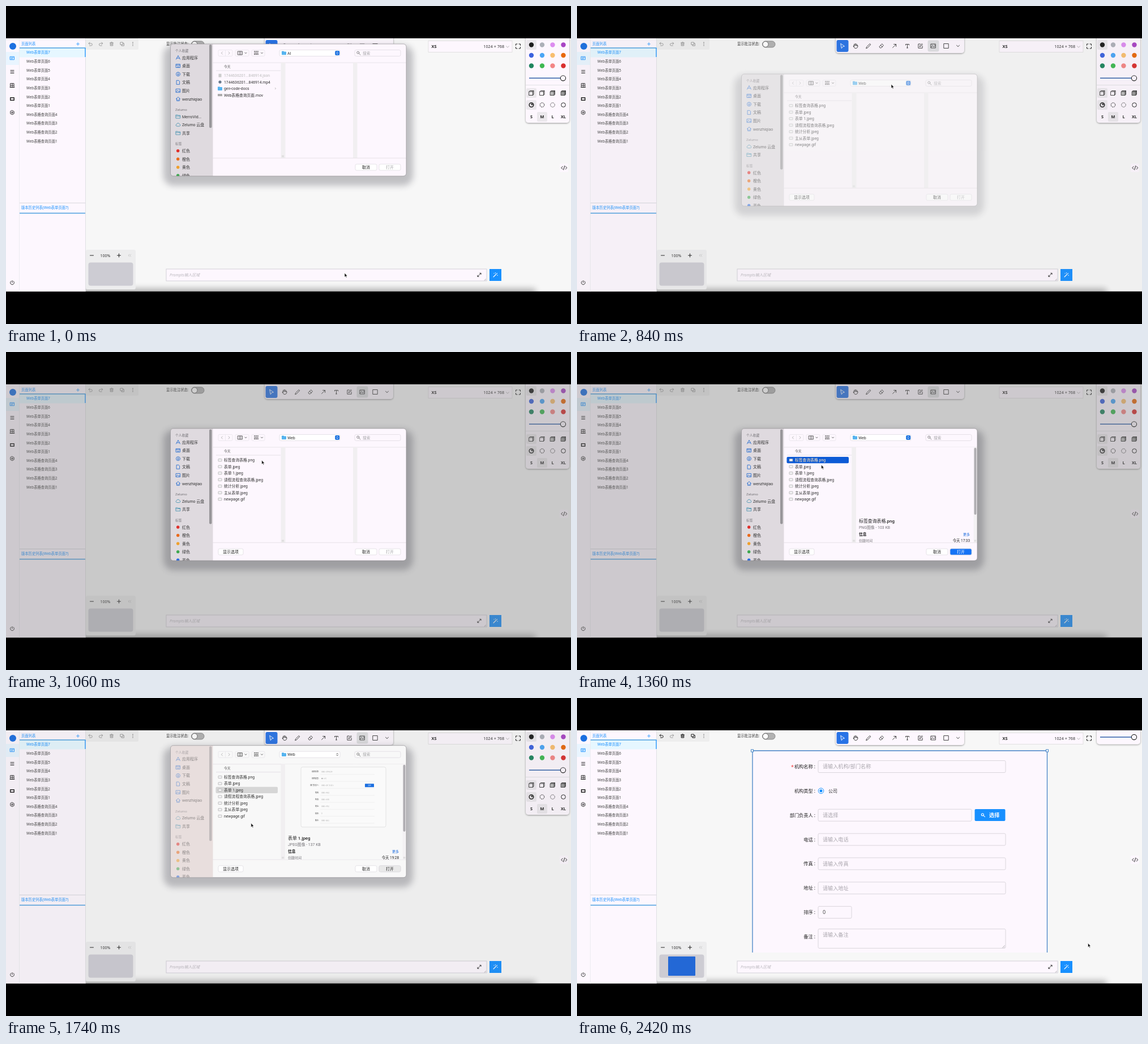
Animation of 998 by 561 pixels, one loop 2.44 s. Source, as an HTML page:

```html
<!DOCTYPE html>
<html>
<head>
<meta charset="utf-8">
<title>Page designer</title>
<style>
html, body { margin: 0; width: 100%; height: 100%; overflow: hidden; background: #000; }
svg { display: block; width: 100vw; height: 100vh; }
text { font-family: "Noto Sans", "Noto Sans CJK SC", "Noto Sans CJK", sans-serif; white-space: pre; }
#dialog text { font-family: Roboto, "Noto Sans CJK SC", "Noto Sans CJK", sans-serif; }
</style>
</head>
<body>
<svg id="stage" viewBox="0 0 998 561"></svg>
<script>
const LOOP = 2440, STEP = 20;
const PANEL = '#fdf7fe', BLUE = '#1890ff', INK = '#222', SOFT = '#a5a5a8';

// markup helpers
const rect = (x, y, w, h, fill, extra = '') =>
  `<rect x="${x}" y="${y}" width="${w}" height="${h}" fill="${fill}" ${extra}/>`;
const line = (x1, y1, x2, y2, color, w = 1) =>
  `<path d="M${x1} ${y1}L${x2} ${y2}" stroke="${color}" stroke-width="${w}"/>`;
const dot = (x, y, r, fill, extra = '') => `<circle cx="${x}" cy="${y}" r="${r}" fill="${fill}" ${extra}/>`;
const text = (x, y, s, size = 6.3, fill = '#333', extra = '') =>
  `<text x="${x}" y="${y + size * .36}" font-size="${size}" fill="${fill}" ${extra}>${s}</text>`;
const icon = (x, y, d, color = INK, w = .8, fill = 'none') =>
  `<path transform="translate(${x} ${y})" d="${d}" fill="${fill}" stroke="${color}" stroke-width="${w}" stroke-linecap="round" stroke-linejoin="round"/>`;
const group = (id, body, extra = '') => `<g id="${id}" ${extra}>${body}</g>`;
const END = 'text-anchor="end"', MID = 'text-anchor="middle"', BOLD = 'font-weight="600"';

const I = {
  undo: 'M-3 -1H1.3a2 2 0 0 1 0 4H-1.5M-1 -3L-3 -1L-1 1',
  redo: 'M3 -1H-1.3a2 2 0 0 0 0 4H1.5M1 -3L3 -1L1 1',
  trash: 'M-3 -2H3M-1 -2V-3.2H1V-2M-2.3 -2V3H2.3V-2M-.8 -.5V1.8M.8 -.5V1.8',
  copy: 'M-3 -3H1.2V1.2H-3ZM-1.2 1.2V3.2H3.2V-1.2H1.2',
  more: 'M0 -2.7v.1M0 0v.1M0 2.7v.1',
  pick: 'M-3 -4L3.5 .5L.4 1.2L-1.5 4Z',
  hand: 'M-2.4 .5V-3M-.8 -.5V-4M.8 -.5V-4M2.4 0V-3M2.4 -1L4 -1V1.5Q3 4.3 0 4.3Q-2 4 -4 .2L-3 -.2L-2.4 .5',
  pencil: 'M-4 4L-3.2 1.5L2.5 -4L4 -2.5L-1.5 3.2Z',
  eraser: 'M-3.5 1L1 -3.8L3.8 -1L-.5 3.5H-1.8ZM-1.5 -1.2L1.7 1.6',
  arrow: 'M-3 3L3 -3M-1 -3H3V1',
  type: 'M-3 -1.5V-3H3V-1.5M0 -3V3.4M-1 3.4H1',
  edit: 'M0 -3.5H-3.5V3.8H3.7V0M-1 1.2L-.8 -.6L3 -4L4 -3L.5 .9Z',
  image: 'M-4 -3.5H4V3.5H-4ZM-4 2L-1 -.5L1 1.5L4 -1M-2 -2v.1M2 -2v.1',
  square: 'M-4 -4H4V4H-4Z',
  down: 'M-2.5 -1.2L0 1.2L2.5 -1.2',
  full: 'M-4 -1.5V-4H-1.5M1.5 -4H4V-1.5M4 1.5V4H1.5M-1.5 4H-4V1.5',
  code: 'M-2.5 -2.5L-5 0L-2.5 2.5M2.5 -2.5L5 0L2.5 2.5M1 -3.5L-1 3.5',
  expand: 'M-3 3L3 -3M.8 -3H3V-.8M-.8 3H-3V.8',
  wand: 'M-3.5 3.5L1.5 -1.5M2.5 -2.5L3 -3M0 -4v.8M3.6 .2v.8M-2.5 -3v.2',
  search: 'M.8 -.8a2 2 0 1 1 -4 0a2 2 0 1 1 4 0M.4 .8L3 3.2',
  card: 'M-3.5 -2.7H3.5V2.7H-3.5ZM-2 -.8H2M-2 1H.5',
  list: 'M-3 -2.5H3M-3 0H3M-3 2.5H3',
  table: 'M-3 -3.4H3V3.4H-3ZM0 -3.4V3.4M-3 0H3M-4 3.4H4',
  screen: 'M-3.2 -2.2H3.2V2.2H-3.2Z',
  gear: 'M0 -3.7L3.2 -1.9V1.9L0 3.7L-3.2 1.9V-1.9ZM1.3 0a1.3 1.3 0 1 1 -2.6 0a1.3 1.3 0 1 1 2.6 0',
  power: 'M-2 -2.7a3.4 3.4 0 1 0 4 0M0 -3.6V0',
  apps: 'M-3.5 3L0 -3.5L3.5 3M-2.5 1H2.5',
  desk: 'M-3.5 -3H3.5V3H-3.5ZM-3.5 -1.2H3.5M-1.5 1.5H1.5',
  load: 'M3.5 0a3.5 3.5 0 1 1 -7 0a3.5 3.5 0 1 1 7 0M0 -2V1.7M-1.4 .4L0 1.7L1.4 .4',
  doc: 'M-2.5 -3.5H1L2.6 -2V3.5H-2.5Z',
  photo: 'M-3.5 -3H3.5V3H-3.5ZM-3.5 2L-1 -.5L1 1.5L2 .5L3.5 2',
  home: 'M-3.7 0L0 -3.5L3.7 0M-2.5 -1V3.2H2.5V-1M0 3V1',
  cloud: 'M-2.5 2.5a1.8 1.8 0 0 1 0 -3.5a2.6 2.6 0 0 1 5 0a1.8 1.8 0 0 1 0 3.5Z',
  folder: 'M-3.7 -2.8H-1L0 -2H3.7V3H-3.7ZM-3.7 -.8H3.7',
  updown: 'M-1.2 -.9L0 -2.2L1.2 -.9M-1.2 .9L0 2.2L1.2 .9'
};

function sideNav() {
  let s = rect(0, 57, 140, 447, PANEL) + rect(0, 81, 23, 23, '#e9f5ff') + dot(12, 71, 6, '#1c6fe0');
  [['card', 92], ['list', 116], ['table', 140], ['screen', 164], ['gear', 188], ['power', 488]]
    .forEach(([k, y], i) => s += icon(11, y, I[k], i ? INK : BLUE, k == 'screen' ? 1.5 : .9));
  s += line(23.5, 57, 23.5, 504, '#ececf0') + line(140.5, 57, 140.5, 504, '#e0e0e4')
    + rect(24, 74, 116.5, 16.5, '#e6f7ff') + line(24, 74, 140.5, 74, '#4a9fdf', 1.3) + line(140, 74, 140, 90, BLUE, 1.3)
    + text(27, 66.5, '页面列表', 6.3, BLUE) + icon(127, 67, 'M-2.5 0H2.5M0 -2.5V2.5', BLUE);
  for (let i = 0; i < 11; i++) {
    const name = i < 7 ? 'Web表单页面' + (7 - i) : 'Web表格查询页面' + (11 - i);
    s += text(36, 82 + i * 15.65, name, 6.3, i ? '#444' : BLUE);
  }
  return s + line(24, 347.5, 140, 347.5, '#d8d8de') + text(27, 355.5, '版本历史列表(Web表单页面7)', 6.3, BLUE)
    + line(24, 365.5, 140, 365.5, '#4a9fdf', 1.3);
}

function toolbars() {
  let s = rect(141, 57, 93, 20, '#eee', 'rx="2"');
  ['undo', 'redo', 'trash', 'copy', 'more'].forEach((k, i) => {
    const p = [149 + i * 18.75, 67, I[k]], w = k == 'more' ? 1.4 : .8;
    s += icon(...p, i == 4 ? '#666' : '#8c8c8c', w);
    if (i == 0 || i == 2 || i == 3) s += `<g class="placed">${icon(...p, INK, w)}</g>`;
  });
  s += text(283, 67, '显示批注状态:') + rect(327.5, 62, 22.5, 11, '#b2b2b2', 'rx="5.5" stroke="#777" stroke-width=".8"')
    + dot(333, 67.5, 5, '#fff', 'stroke="#555" stroke-width=".8"');
  s += rect(457, 50, 227, 33, PANEL, 'rx="5" filter="url(#lift)"') + rect(458.5, 60, 21, 21, '#2873e6', 'rx="3"')
    + group('hover', rect(619.5, 60.5, 20, 20, '#dfdfe2', 'rx="3"'));
  ['pick', 'hand', 'pencil', 'eraser', 'arrow', 'type', 'edit', 'image', 'square', 'down']
    .forEach((k, i) => s += icon(i == 9 ? 673 : 469 + i * 22.9, 70.5, I[k], i ? '#333' : '#fff', .9));
  return s + rect(746, 61.5, 148, 20, PANEL, 'stroke="#ddd" stroke-width=".8"') + text(751.5, 71.5, 'XS', 7.4, INK, BOLD)
    + text(880, 71.5, '1024 × 768', 7.2, '#333', END) + icon(886, 72, I.down, '#999', .7) + icon(904.5, 71, I.full, INK, 1);
}

function palette() {
  const xs = [928, 947, 965.5, 984.5];
  const dots = ['#1d1d1d', '#adb0b8', '#dd8cf0', '#a844c4', '#3c62de', '#4ba5f5', '#f8be70', '#e8680c',
    '#20855f', '#3fb852', '#f38585', '#d92f2f'];
  const slider = y => line(924, y, 984, y, '#2f5fa8', 1.6) + dot(984, y, 4.6, PANEL, 'stroke="#222" stroke-width="1.1"');
  const back = (x, y) => rect(x - 9, y - 8.5, 18, 17, '#ebe8ec', 'rx="2"');
  let s = rect(918, 50, 77, 156, PANEL, 'rx="5" filter="url(#lift)"')
    + back(928, 68.5) + back(928, 153.5) + back(928, 174.5) + back(947, 195.5);
  dots.forEach((c, i) => s += dot(xs[i % 4], 68.5 + (i >> 2) * 18.5, 4.2, c));
  s += slider(127.3) + line(918, 139.5, 995, 139.5, '#e2e2e6');
  xs.forEach((x, i) => {
    s += icon(x, 153.5, 'M-4 -2.5L-2.5 -4H4V2.5L2.5 4H-4ZM-4 -2.5H2.5V4M2.5 -2.5L4 -4', '#333', .9, ['none', PANEL, '#bbb', '#999'][i]);
    s += dot(x, 174.5, 3.8, 'none', `stroke="${INK}" stroke-width="${i ? 1 : 1.5}" stroke-dasharray="${['none', '2 1', '1 .8', 'none'][i]}"`);
    s += text(x, 195.5, ['S', 'M', 'L', 'XL'][i], 7.4, INK, MID + BOLD);
  });
  s += dot(929.2, 173.3, 2, '#555');
  return group('palette', s) + `<g class="placed">${rect(918, 50, 77, 31.5, PANEL, 'rx="5" filter="url(#lift)"') + slider(69)}</g>`
    + rect(978, 278, 15, 15, PANEL, 'rx="2"') + icon(985.8, 285.5, I.code, INK, 1);
}

function footer() {
  return rect(70, 499, 865, 16, '#000', 'opacity=".3" filter="url(#blur)"')
    + rect(141, 430, 88, 70, '#ededee', 'rx="3"') + icon(151.5, 440, 'M-3 0H3', INK, 1)
    + text(175.5, 440, '100%', 7, '#333', MID) + icon(199.5, 440, 'M-3 0H3M0 -3V3', INK, 1)
    + icon(218.5, 440, 'M-.5 -2L-2.5 0L-.5 2M2.2 -2L.2 0L2.2 2', '#bbb', .7)
    + rect(145.5, 452.5, 79, 41, '#cdccd3', 'rx="4"')
    + `<g class="placed">${rect(161, 456, 48, 34, '#2368d6', 'rx="1"')}</g>`
    + rect(283, 464, 566, 21, PANEL, 'stroke="#d3d1d8"') + text(289, 474.3, 'Prompts输入区域', 6.9, '#bbb8be', 'font-style="italic"')
    + icon(836, 474.3, I.expand, INK, .9) + icon(846, 482.5, 'M-1 1.5L1.5 -1M.5 1.5L1.5 .5', '#888', .5)
    + rect(854, 464, 21, 21, BLUE) + icon(864.5, 474.5, I.wand, '#fff', 1.1);
}

const fields = ['机构名称', '机构类型', '部门负责人', '电话', '传真', '地址', '排序', '备注'];

function form() {
  const hints = ['请输入机构/部门名称', '', '请选择', '请输入电话', '请输入传真', '请输入地址', '', '请输入备注'];
  const widths = [331, 0, 271, 331, 331, 331, 59, 331];
  let s = `<path d="M310 449V93H830.5V449" fill="${PANEL}" stroke="#4583c6" stroke-width="1.3"/>`;
  for (const x of [309.5, 830.5]) s += rect(x - 2, 91, 4, 4, '#fff', 'stroke="#4583c6"');
  fields.forEach((f, i) => {
    const y = 121 + i * 42.85;
    s += text(421, y, f + ' :', 8.2, INK, END);
    if (widths[i]) s += rect(426, y - (i == 7 ? 13.5 : 10.5), widths[i], i == 7 ? 34 : 21, 'none', 'rx="2" stroke="#dad6dc"');
    s += text(434, i == 7 ? 418 : y, hints[i], 9.1, '#aaa6ad');
  });
  return s + text(378, 122, '*', 9, '#e33') + dot(431, 163.8, 4.8, '#fff', `stroke="${BLUE}"`) + dot(431, 163.8, 2.6, BLUE)
    + text(444, 164, '公司', 8) + text(434, 378, '0', 9, '#444') + icon(753.5, 438.5, 'M-2 2L2 -2M.5 2L2 .5', '#888', .6)
    + rect(702.5, 196, 54, 21, BLUE, 'rx="2"') + icon(717.5, 206.5, I.search, '#fff', 1.1) + text(728, 206.5, '选择', 9.2, '#fff', BOLD);
}

// file dialog, drawn with its top edge at y = 0
function sideList() {
  let s = text(299, 12, '个人收藏', 5.8, '#77757a') + text(299, 116, 'Zelumo', 6.2, '#77757a');
  [['apps', '应用程序'], ['desk', '桌面'], ['load', '下载'], ['doc', '文稿'], ['photo', '图片'], ['home', 'wenzhiqiao']]
    .forEach(([k, n], i) => s += icon(304, 24 + i * 14.6, I[k], '#2a6fd0', .9) + text(311, 24 + i * 14.6, n, 7));
  const lower = shared => {
    let y = 128, out = '';
    for (const [k, n] of shared) {
      out += icon(304, y, I[k], '#3e8fae', .8) + text(311, y, n, 7);
      y += 14.5;
    }
    out += text(299, y + 4.5, '标签', 5.8, '#77757a');
    [['红色', '#e0302c'], ['橙色', '#ea6a1b'], ['黄色', '#f0a02c'], ['绿色', '#3fa850'], ['蓝色', '#2a6ae0']]
      .forEach(([n, c], i) => out += dot(303.7, y + 17 + i * 14.5, 2.7, c) + text(311, y + 17 + i * 14.5, n, 7));
    return out;
  };
  const base = [['cloud', 'Zelumo 云盘'], ['folder', '共享']];
  return s + `<g class="first">${lower([['folder', 'MerroVid...'], ...base]) + rect(359, 1, 4.5, 147, '#98969a', 'rx="2"')}</g>`
    + `<g class="second">${lower(base) + rect(359, 1.5, 4.5, 167, '#98969a', 'rx="2"')}</g>`;
}

const files = ['标签查询表格.png', '表单.jpeg', '表单 1.jpeg', '请假流程查询表格.jpeg', '统计分析.jpeg', '主从表单.jpeg', 'newpage.gif'];
const rowY = i => 55.6 + i * 11.5;
const fileIcon = y => rect(375, y - 2, 6, 4.2, '#f4f4f6', 'stroke="#999" stroke-width=".6" rx=".5"');
const folderIcon = (x, y) => rect(x - 4, y - 3.2, 4, 2, '#3d9be0', 'rx=".6"') + rect(x - 4, y - 2.5, 8, 5.8, '#55b4f0', 'rx=".8"');
const button = (x, w, label, color = INK, fill = '#fff') =>
  rect(x, 212, w, 11, fill, 'rx="2.5" stroke="#dcd8de" stroke-width=".7"') + text(x + w / 2, 217.3, label, 6.9, color, MID);

function preview(name, kind, time) {
  return rect(487, 33, 219, 168, 'var(--main)') + rect(485.5, 33, 7.5, 168, '#f1eff1')
    + rect(700.5, 33, 6.5, 168, '#f4f2f4') + rect(701.5, 34, 4, 118, '#b0aeb2', 'rx="2"')
    + text(498, 163.5, name, 7.9, INK, 'font-weight="500"') + text(498, 174.5, kind, 6.9, '#77757a')
    + text(498, 187, '信息', 6.8, INK, BOLD) + text(694, 187, '更多', 6, '#1668dc', END)
    + text(498, 198, '创建时间', 6, '#77757a') + text(694, 198, time, 6.4, INK, END)
    + icon(489, 198, 'M-1 -1.2V1.2M1 -1.2V1.2', '#aaa', .5) + icon(703.5, 198, 'M-1 -1.2V1.2M1 -1.2V1.2', '#aaa', .5);
}

function thumb() {
  let s = rect(521, 38, 150, 106, '#fafafa', 'rx="3" stroke="#ddd" stroke-width=".8"');
  fields.forEach((f, i) => {
    const y = 46 + i * 12.3;
    s += text(552.5, y, f + ':', 2.9, '#333', END) + text(557, y, i == 1 ? '● 公司' : i == 6 ? '0' : '请输入' + f, 2.8, '#aaa')
      + line(555, y + 5, 651, y + 5, '#e4e4e4', .5);
  });
  return s + rect(634, 67.5, 16, 6, '#1b6fe0', 'rx=".6"') + text(642, 70.5, '选择', 2.8, '#fff', MID);
}

function dialog() {
  let s = rect(290.5, 0, 416.5, 233, 'var(--main)') + rect(290.5, 0, 75, 233, 'var(--side)') + group('side', sideList())
    + rect(375, 10.5, 25, 11, 'none', 'rx="2" stroke="#e6e2e8" stroke-width=".7"') + line(387.5, 11, 387.5, 21, '#e6e2e8', .7)
    + icon(381.5, 16, 'M1 -2.2L-1.2 0L1 2.2', '#aaa') + icon(394, 16, 'M-1 -2.2L1.2 0L-1 2.2', '#aaa')
    + rect(405, 10.5, 24, 11, 'none', 'rx="2" stroke="#e6e2e8" stroke-width=".7"')
    + rect(434, 10.5, 23, 11, 'none', 'rx="2" stroke="#e6e2e8" stroke-width=".7"')
    + icon(413.5, 16, 'M-4 -3H4V3H-4ZM-1.3 -3V3M1.3 -3V3', '#444') + icon(423.5, 16, 'M-1.5 -.8L0 .8L1.5 -.8', '#444')
    + icon(442, 16, 'M-3.5 -2.8H-2M-.5 -2.8H1M2.5 -2.8H3.5M-3.5 0H3.5M-3.5 2.3H-2M-.5 2.3H1M2.5 2.3H3.5', '#444', 1.2)
    + icon(452, 16, 'M-1.5 -.8L0 .8L1.5 -.8', '#444')
    + rect(483, 10.5, 107, 11, '#fff', 'rx="2.5" stroke="#ddd8e0" stroke-width=".7"') + folderIcon(491, 16)
    + `<g class="first">${text(497, 16.2, 'AI', 7)}</g><g class="second">${text(497, 16.2, 'Web', 7)}</g>`
    + group('knob', rect(581.2, 12, 8, 8, '#1c72e0', 'rx="2"') + icon(585.2, 16, I.updown, '#fff'))
    + group('knobOff', icon(585.2, 16, I.updown, '#333'))
    + rect(616, 10.5, 81, 11, 'none', 'rx="2.5" stroke="#ddd8e0" stroke-width=".7"') + icon(623, 16, I.search, '#666') + text(630, 16.2, '搜索', 6.8, SOFT)
    + line(365, 33, 707, 33, '#e2dee4', .8) + text(385, 40, '今天', 5.8, '#555') + line(371, 47, 485, 47, '#dedae0', .8)
    + rect(485.5, 33, 8, 168, '#f1eff1') + rect(613, 33, 7.5, 168, '#f1eff1') + icon(489, 198, 'M-1 -1.2V1.2M1 -1.2V1.2', '#aaa', .5)
    + line(365, 201.3, 707, 201.3, '#e2dee4', .8) + button(617, 38, '取消') + button(659, 38, '打开', SOFT);
  const old = text(385, rowY(0), '1744636201...846914.json', 6.8, '#bbb') + rect(375.5, rowY(0) - 3, 5, 6, '#ccc')
    + dot(378, rowY(1), 2.6, '#66788c') + text(385, rowY(1), '1744636201...846914.mp4', 6.8)
    + folderIcon(378, rowY(2)) + text(385, rowY(2), 'gen-code-docs', 6.8) + icon(476, rowY(2), 'M-.6 -1.2L.6 0L-.6 1.2', '#888', .6)
    + rect(374, rowY(3) - 2, 8, 4, '#aaa') + text(385, rowY(3), 'Web表格查询页面.mov', 6.8);
  const mark = (i, c) => rect(370.5, rowY(i) - 5.7, 109.5, 11.4, c, 'rx="2"');
  const list = files.map((f, i) => fileIcon(rowY(i)) + text(385, rowY(i), f, 6.8)).join('');
  s += `<g class="first">${old}</g><g class="second">${button(375, 44, '显示选项')}`
    + group('pickA', preview(files[0], 'PNG图像 - 103 KB', '今天 17:33') + mark(0, '#0d5bd6'))
    + group('pickB', preview(files[2], 'JPEG图像 - 137 KB', '今天 19:28') + thumb() + group('markB', mark(2, '#0d5bd6')) + group('markOff', mark(2, '#d6d6d6')))
    + list + group('nameA', text(385, rowY(0), files[0], 6.8, '#fff')) + group('nameB', text(385, rowY(2), files[2], 6.8, '#fff'))
    + group('openOn', button(659, 38, '打开', '#fff', '#1473f5')) + group('openOff', button(659, 38, '打开', INK, '#e9e9e9')) + '</g>';
  return rect(278, 2, 441, 248, '#30303c', 'rx="18" opacity=".28" filter="url(#blur)"')
    + `<g clip-path="url(#sheet)">${s}</g>` + rect(290.5, 0, 416.5, 233, 'none', 'rx="5" stroke="#8a888c" stroke-width=".6"');
}

const stage = document.getElementById('stage');
stage.innerHTML = `<defs>
  <clipPath id="app"><rect y="57" width="998" height="446.5"/></clipPath>
  <clipPath id="sheet"><rect x="290.5" width="416.5" height="233" rx="5"/></clipPath>
  <filter id="blur" x="-10%" y="-100%" width="120%" height="300%"><feGaussianBlur stdDeviation="6"/></filter>
  <filter id="lift" x="-10%" y="-20%" width="120%" height="150%"><feDropShadow dx="0" dy="1" stdDeviation="1.5" flood-opacity=".4"/></filter>
</defs><g clip-path="url(#app)">${rect(0, 57, 998, 447, '#f7f7f7')}`
  + `<g class="placed">${form()}</g>` + footer() + sideNav() + toolbars() + palette()
  + rect(0, 57, 998, 447, '#787878', 'id="shade"') + group('dialog', dialog()) + '</g>'
  + group('cursor', '<path d="M0 0V7.2L1.7 5.7L2.9 8.3L4 7.8L2.9 5.3H5Z" fill="#111" stroke="#fff" stroke-width=".6"/>');

const el = id => document.getElementById(id);
const show = (node, on) => node.style.display = on ? '' : 'none';
const showAll = (name, on) => document.querySelectorAll('.' + name).forEach(n => show(n, on));

// motion tables: [time, value...]
const top_ = [[0, 67], [60, -180], [800, 108], [840, 120], [880, 129], [960, 135], [1660, 135], [1680, 134], [1760, 67], [1820, -180]];
const fade = [[0, 1], [60, 1], [800, 0], [840, .55], [880, 1]];
const shade = [[800, 0], [840, .055], [880, .26], [960, .36], [1660, .36], [1680, .31], [1760, 0]];
const pointer = [[0, 598, 471], [240, 598, 471], [680, 629, 72], [760, 629, 72], [840, 555, 138], [880, 504.5, 186], [1100, 440, 192],
  [1360, 431.5, 199], [1560, 419, 217], [1720, 419, 217], [2020, 626.5, 272.5], [2140, 640, 285], [2380, 902.5, 432.5]];

function at(keys, t) {
  const i = keys.findIndex(k => k[0] > t);
  if (i == 0) return keys[0].slice(1);
  if (i < 0) return keys[keys.length - 1].slice(1);
  const a = keys[i - 1], b = keys[i], p = (t - a[0]) / (b[0] - a[0]);
  return a.slice(1).map((v, n) => v + (b[n + 1] - v) * p);
}

function draw(t) {
  const box = el('dialog'), first = t < 60, placed = t >= 2120, idle = t >= 1670;
  const pickA = t >= 1320 && t < 1560, pickB = t >= 1560;
  show(box, first || t >= 800 && t < 1820);
  box.setAttribute('transform', `translate(0 ${at(top_, t)})`);
  box.setAttribute('opacity', at(fade, t));
  box.style.setProperty('--main', idle ? '#f8f8f8' : PANEL);
  box.style.setProperty('--side', idle ? '#e8dedd' : '#dfdadf');
  el('shade').setAttribute('opacity', at(shade, t));
  el('side').setAttribute('opacity', idle ? .5 : 1);
  showAll('first', first);
  showAll('second', !first);
  showAll('placed', placed);
  const parts = {
    palette: !placed, hover: t >= 680 && t < 1780, knob: !idle, knobOff: idle,
    pickA, pickB, nameA: pickA, nameB: pickB && !idle, markB: !idle, markOff: idle,
    openOn: (pickA || pickB) && !idle, openOff: idle
  };
  for (const id in parts) show(el(id), parts[id]);
  el('cursor').setAttribute('transform', `translate(${at(pointer, t)})`);
}

const start = performance.now();
function tick() {
  const t = (performance.now() - start) % LOOP;
  draw(Math.floor(t / STEP) * STEP);
  requestAnimationFrame(tick);
}
tick();
</script>
</body>
</html>
```
